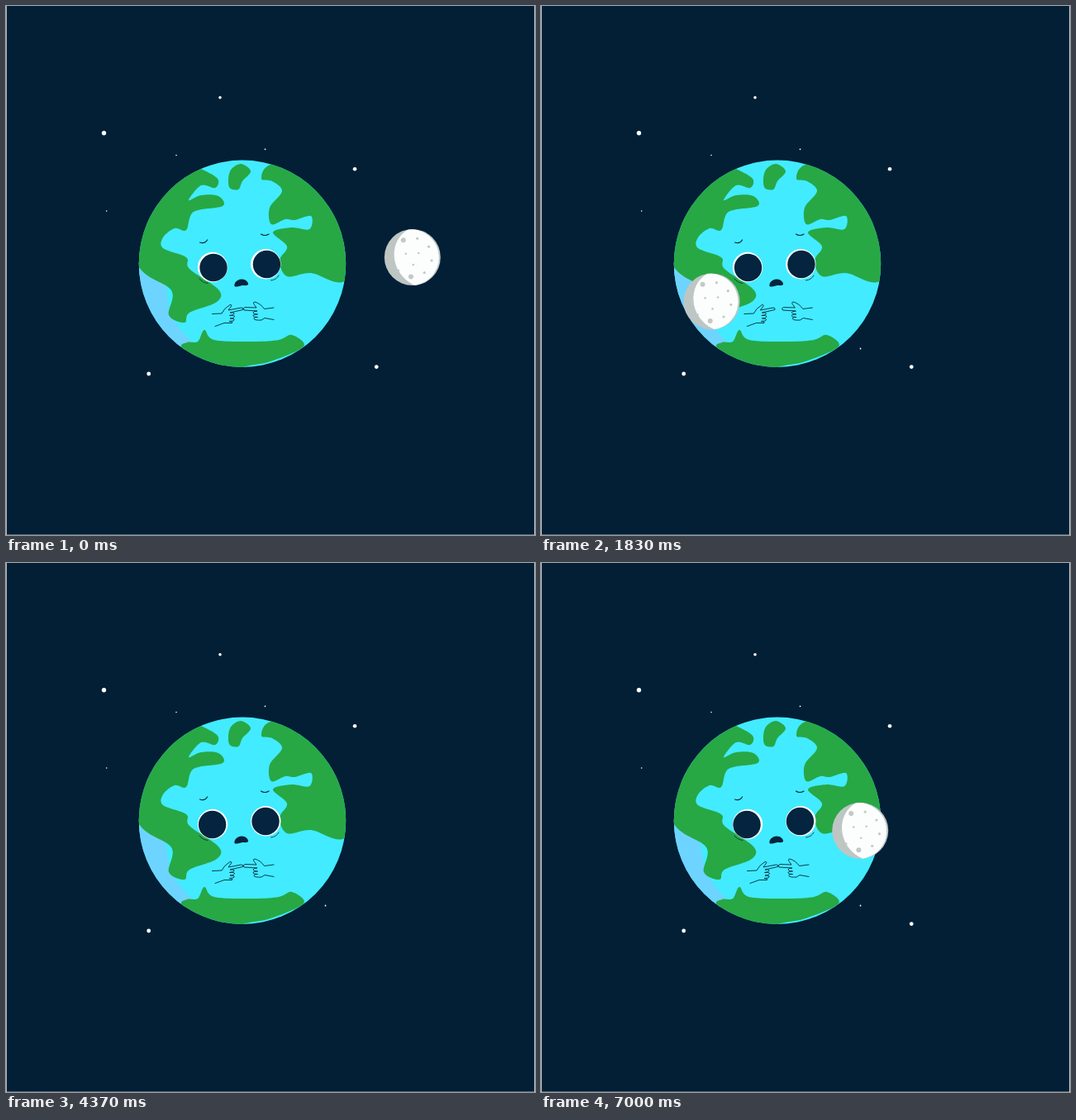
Recreate the animation shown at these times as an HTML page. Size 640x640 px, loop 7.03 s.

```html
<!DOCTYPE html>
<html lang="en">
<head>
<meta charset="utf-8">
<title>Earth and Moon</title>
<style>
html, body { margin: 0; width: 100%; height: 100%; overflow: hidden; background: #fff; }
svg { display: block; width: 100vw; height: 100vh; }
.line { fill: none; stroke: #052a40; stroke-linecap: round; stroke-linejoin: round; }
</style>
</head>
<body>
<svg viewBox="0 0 640 640">
  <defs><clipPath id="globe"><circle cx="286" cy="311.7" r="125.2"/></clipPath></defs>
  <rect x=".7" width="638.6" height="639.7" fill="#021f35"/>
  <g id="stars" fill="#fff"></g>
  <g id="back"></g>
  <g clip-path="url(#globe)">
    <rect x="160" y="185" width="253" height="253" fill="#42ebff"/>
    <path d="M155 305L192 330L198 372Q210 392 225 406L210 425L150 400Z" fill="#6dd4ff"/>
    <g id="land" fill="#27a845"></g>
  </g>
  <g class="line">
    <path d="M234.5 286Q240.500 288 243.500 283M308.500 276Q313 279 318 276" stroke-width="1.200"/>
    <path d="M234 330Q238 335 244 335.500M320.500 332Q327 331.500 330 326" stroke-width=".8"/>
  </g>
  <g fill="#fff"><circle cx="250" cy="316" r="18.200"/><circle cx="314.300" cy="312.300" r="18.200"/></g>
  <g id="pupils" fill="#04243f">
    <circle cx="249.800" cy="316.500" r="16.700"/><circle cx="314.200" cy="312.500" r="16.700"/>
  </g>
  <path d="M276.500 339C275.500 335 280 330.500 285 330.500C290 330.500 293.500 334 293 337C291 339 288 337.500 284 338.500C280 339.500 278 340 276.500 339Z" fill="#04243f"/>
  <g class="line" stroke-width=".9">
    <path id="handL" d="M249.500 372.500L261 372Q263.500 366 271 361.500Q274 361 272 364L269 368L284.500 365Q287.500 365 286.500 367.500L271 371Q276.500 370.500 276 372.500Q275.500 374 270.500 374.500Q277 374 276.500 376Q276 378 271 378Q277 378 276 380Q275 381.500 270 381.500Q275.500 382 273.500 383.500L264 383.500L253 387.500"/>
    <path id="handR" d="M324 365L312.500 366.500Q308 360 301 358Q298 358.500 300.500 361.500L303 365L289 364.500Q286 365.500 288 368L304 369Q299 369 299 371Q299 373 304.500 373Q298.500 373 299 375Q299.500 376.500 304.500 376.500Q299 376.500 300 378.500Q301 380.500 309 380L313 377.500L324 379.500"/>
  </g>
  <g id="front">
    <g id="moon">
      <circle r="34" fill="#bec6c4"/>
      <path d="M-5 -33.600C-30 -20 -28 20 3 33.900A34 34 0 0 0 -5 -33.600Z" fill="#fcfefe"/>
      <g id="craters" fill="#c3c9c7"></g>
    </g>
  </g>
</svg>
<script>
const $ = id => document.getElementById(id);
const LOOP = 7030, BLINK = 2075, CROSSING = 3020;

function add(parent, tag, attrs) {
  const el = document.createElementNS('http://www.w3.org/2000/svg', tag);
  for (const k in attrs) el.setAttribute(k, attrs[k]);
  return parent.appendChild(el);
}

// Closed Catmull-Rom curve through "x,y" points
function curve(text) {
  const p = text.split(' ').map(s => s.split(',').map(Number)), n = p.length;
  let d = 'M' + p[0];
  p.forEach((b, i) => {
    const a = p[(i + n - 1) % n], c = p[(i + 1) % n], e = p[(i + 2) % n];
    const c1 = b.map((v, k) => v + (c[k] - a[k]) / 6);
    const c2 = c.map((v, k) => v - (e[k] - b[k]) / 6);
    d += `C${c1} ${c2} ${c}`;
  });
  return d + 'Z';
}

// Key points of each coast; the globe clips the outer sides
[
  '236,197 256,209 253,220 236,217 221,235 236,229 257,230 262,242 227,249 218,271 204,269 190,280 190,293 218,304 222,318 257,343 255,358 222,371 216,383 197,374 200,344 161,316 140,250 200,180',
  '271,200 284,191 296,200 286,212 281,222 270,219',
  '320,192 309,209 322,212 334,224 319,244 321,264 338,258 349,259 369,254 367,270 345,268 323,274 340,291 331,308 340,327 369,323 411,332 440,270 370,190',
  '213,415 219,407 232,406 240,392 252,404 300,406 330,404 346,398 360,412 320,430 290,436 240,450'
].forEach(s => add($('land'), 'path', { d: curve(s) }));

// Craters sit on an outer and an inner ring
function ring(count, radius, from, step, size) {
  for (let i = 0; i < count; i++) {
    const a = (from + i * step) * Math.PI / 180;
    add($('craters'), 'circle', { cx: radius * Math.cos(a), cy: radius * Math.sin(a), r: size(i) });
  }
}
ring(8, 23.5, 242, 42.5, i => i % 5 ? 1.6 : 3);
ring(3, 9, 208, 118, () => 1.3);

// x, y, radius, time of the first blink
const stars = [
  [118.5, 153.7, 2.7, 340], [259, 110.7, 1.8, 1060], [206, 180.5, .8, 1500],
  [313.5, 173.3, .9, 1600], [422, 197.3, 2.3, 500], [121.7, 248, .8, 780],
  [172.7, 445, 2.4, 1600], [386.5, 414.5, .9, 2050], [448.2, 436.6, 2.4, 2095]
].map(([cx, cy, r, first]) => ({ el: add($('stars'), 'circle', { cx, cy, r }), first }));

const ease = p => { p = Math.min(1, Math.max(0, p)); return p * p * (3 - 2 * p); };
const move = (id, x, y = 0) => $(id).setAttribute('transform', `translate(${x} ${y})`);

function draw(t) {
  // The moon crosses in front, then returns behind the globe
  const trip = (t + 15) / CROSSING, returning = Math.floor(trip) % 2;
  const e = ease(trip % 1), k = returning ? 1 - e : e;
  const layer = $(returning ? 'back' : 'front');
  if ($('moon').parentNode !== layer) layer.appendChild($('moon'));
  move('moon', 491.8 - 429.5 * k, 304 + 80.5 * k);

  const h = t % (LOOP / 2);
  const apart = ease((h - 1370) / 1130) - ease((h - 2790) / 700);
  move('handL', -10 * apart);
  move('handR', 12 * apart);

  move('pupils', 1.2 * Math.cos(2 * Math.PI * t / 1605));

  for (const { el, first } of stars) {
    const since = (t - first + BLINK) % BLINK;
    el.setAttribute('opacity', since >= 0 && since < 220 ? 0 : 1);
  }
}

const start = performance.now();
function tick() {
  draw((performance.now() - start) % LOOP);
  requestAnimationFrame(tick);
}
tick();
</script>
</body>
</html>
```
